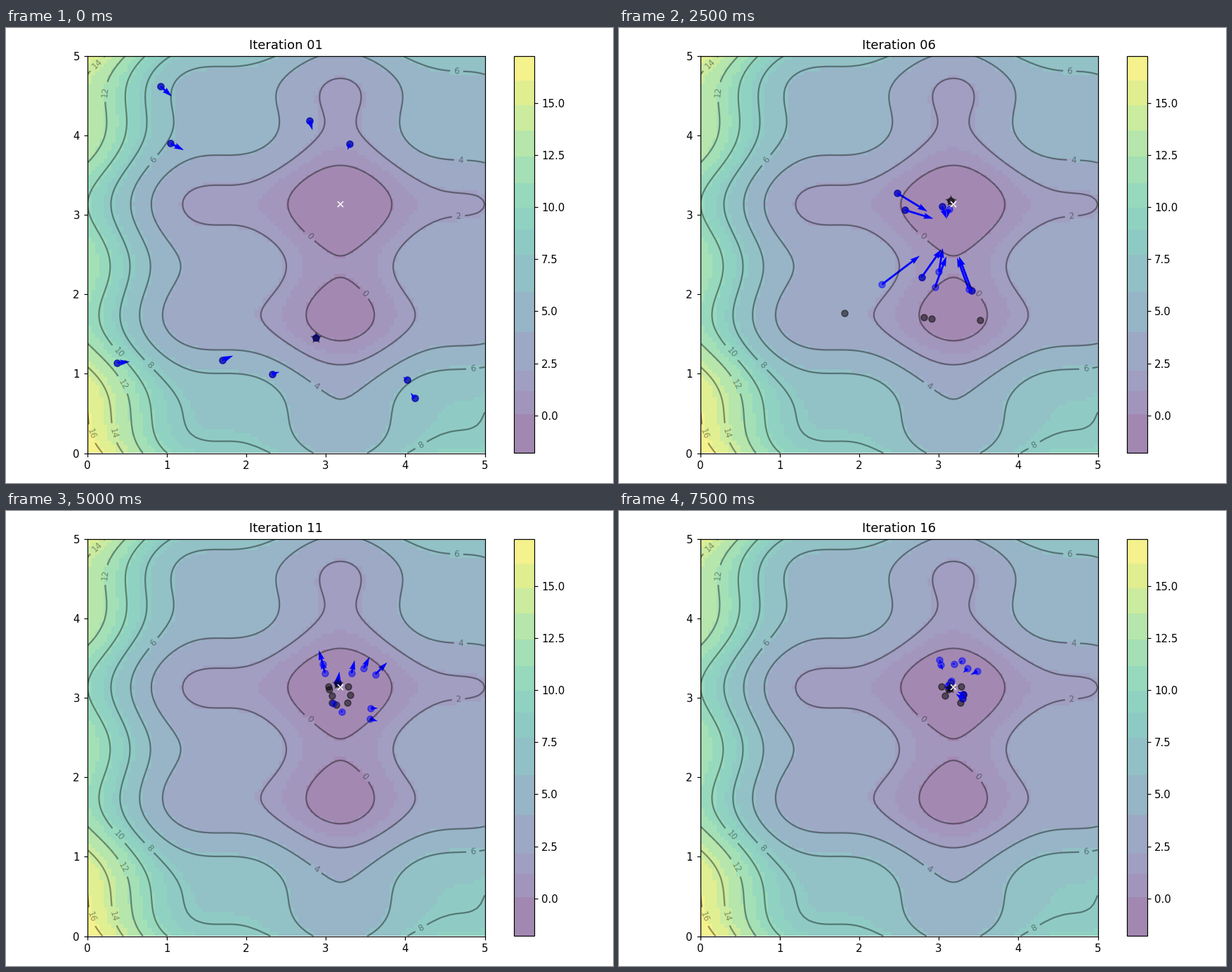
Animation, 864 px wide and 648 px high, one loop 8 s. Source, as a matplotlib script:

```python
import numpy as np
import matplotlib.pyplot as plt
from matplotlib.animation import FuncAnimation
from matplotlib.colors import ListedColormap

W, H, DPI = 864, 648, 108
STEPS = 16
N = 10
INERTIA, C1, C2 = 0.8, 0.1, 0.1


def f(x, y):
    return ((x - 3.14) ** 2 + (y - 2.72) ** 2
            + np.sin(3 * x + 1.41) + np.sin(4 * y - 1.73))


def swarm(steps):
    """Run the particle swarm; return (X, V, pbest, gbest) for each step."""
    rng = np.random.RandomState(100)
    X = rng.rand(2, N) * 5
    V = rng.rand(2, N) * 0.1
    pbest, score = X.copy(), f(*X)
    states = []
    for _ in range(steps):
        gbest = pbest[:, [score.argmin()]]
        r1, r2 = rng.rand(2)
        V = INERTIA * V + C1 * r1 * (pbest - X) + C2 * r2 * (gbest - X)
        X = X + V
        value = f(*X)
        better = score >= value
        pbest = np.where(better, X, pbest)
        score = np.minimum(score, value)
        states.append((X, V, pbest, pbest[:, score.argmin()]))
    return states


def banded(edges):
    """Viridis in flat bands between the given values."""
    edges = (np.array(edges) - edges[0]) / (edges[-1] - edges[0])
    mids = (edges[1:] + edges[:-1]) / 2
    band = np.digitize(np.linspace(0, 1, 256), edges[1:-1])
    return ListedColormap(plt.cm.viridis(mids[band]))


def place(axes, x, y, w, h):
    axes.set_position([x / W, 1 - (y + h) / H, w / W, h / H])


# The first shown step already has one update behind it
states = swarm(STEPS + 1)[1:]

grid = np.linspace(0, 5, 100)
x, y = np.meshgrid(grid, grid)
z = f(x, y)
low = z.argmin()

cmap = banded([z.min(), 0, 1.15, 2.1, 4, 5.9, 7.7, 8.9, 10, 11.2,
               12.4, 13.7, 14.9, 16.1, z.max()])

fig, ax = plt.subplots(figsize=(W / DPI, H / DPI), dpi=DPI)
img = ax.imshow(z, extent=[0, 5, 0, 5], origin="lower", cmap=cmap, alpha=0.5)
bar = fig.colorbar(img, ax=ax)
ax.plot(x.flat[low], y.flat[low], marker="x", markersize=5, color="white")
contours = ax.contour(x, y, z, 10, colors="black", alpha=0.4)
ax.clabel(contours, inline=True, fontsize=8, fmt="%.0f")

X, V, pbest, gbest = states[0]
pbest_dots = ax.scatter(*pbest, marker="o", color="black", alpha=0.5)
dots = ax.scatter(*X, marker="o", color="blue", alpha=0.5)
arrows = ax.quiver(*X, *V, color="blue", width=0.005,
                   angles="xy", scale_units="xy", scale=1)
star = ax.scatter(*gbest, marker="*", s=100, color="black", alpha=0.4)
ax.set(xlim=(0, 5), ylim=(0, 5))
title = ax.set_title("Iteration 01")

place(ax, 115.5, 39.5, 566, 566)
place(bar.ax, 723.4, 39.5, 28.3, 566)


def animate(i):
    X, V, pbest, gbest = states[i]
    title.set_text(f"Iteration {i + 1:02d}")
    pbest_dots.set_offsets(pbest.T)
    dots.set_offsets(X.T)
    arrows.set_offsets(X.T)
    # Arrow angles follow the stored base points
    arrows.X, arrows.Y, arrows.XY = X[0], X[1], X.T
    arrows.set_UVC(*V)
    star.set_offsets(gbest)
    return title, pbest_dots, dots, arrows, star


anim = FuncAnimation(fig, animate, frames=STEPS, interval=500,
                     repeat=True, repeat_delay=0, blit=False)
plt.show()
```
